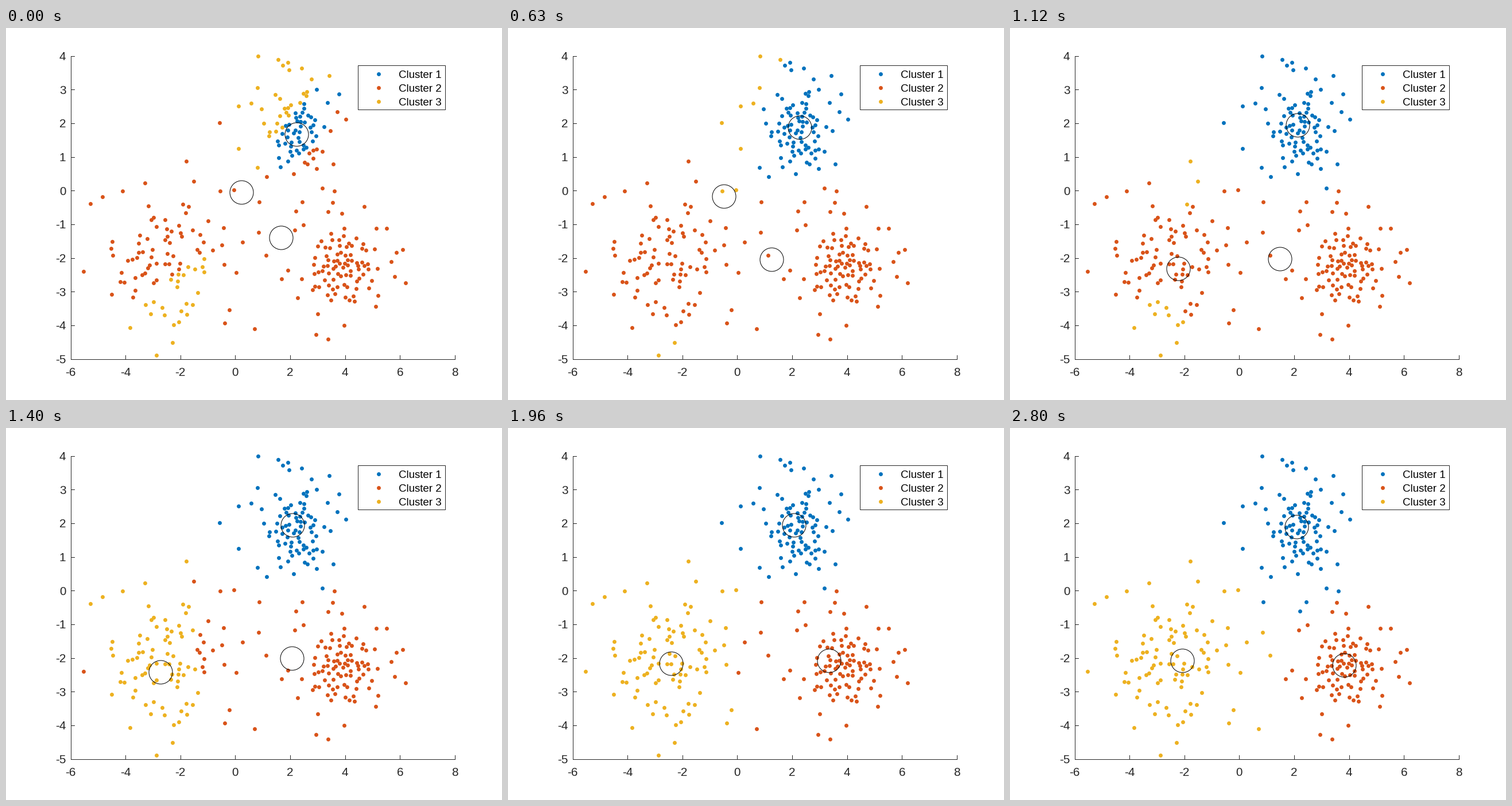
A matplotlib script for the animation above (3300 ms loop, 864 by 648 pixels).

```python
import numpy as np
import matplotlib.pyplot as plt
from matplotlib.animation import FuncAnimation
from matplotlib.patches import Rectangle

W, H = 864, 648
TICK_MS, STEP_MS, LOOP_MS, LAST_STEP = 10, 70, 3300, 40
LEFT, RIGHT, TOP, BOTTOM = 112.5, 782, 48.5, 576.5
INK = "#262626"
COLORS = ["#0072BD", "#D95319", "#EDB120"]


def to_px(x, y):
    return (LEFT + (x + 6) * (RIGHT - LEFT) / 14,
            BOTTOM - (y + 5) * (BOTTOM - TOP) / 9)


def to_data(px):
    return np.column_stack([(px[:, 0] - LEFT) * 14 / (RIGHT - LEFT) - 6,
                            (BOTTOM - px[:, 1]) * 9 / (BOTTOM - TOP) - 5])


# Outlying points of each group, in pixels; the dense cores are random.
TOP_RIM = [(439, 49), (474, 55), (491, 60), (515, 70), (482, 65), (493, 73),
           (563, 83), (532, 89), (580, 115), (541, 107), (560, 130),
           (577, 146), (592, 159), (565, 179), (551, 215), (570, 237),
           (541, 245), (572, 284), (551, 279), (516, 303), (454, 259),
           (438, 243), (405, 210), (405, 136), (372, 165), (427, 131),
           (438, 104)]
RIGHT_RIM = [(663, 349), (645, 349), (624, 311), (585, 323), (569, 304),
             (561, 320), (505, 319), (503, 352), (518, 343), (691, 386),
             (680, 391), (671, 407), (677, 433), (696, 444), (648, 466),
             (644, 485), (589, 518), (561, 542), (540, 534), (543, 498),
             (508, 470), (515, 437), (480, 437), (491, 422)]
LEFT_RIM = [(147, 306), (168, 294), (203, 284), (242, 270), (314, 232),
            (327, 267), (373, 284), (397, 282), (441, 303), (440, 356),
            (453, 396), (412, 373), (401, 426), (389, 491), (381, 514),
            (433, 524), (262, 570), (290, 548), (216, 522), (292, 517),
            (135, 424), (184, 464), (183, 384)]

rng = np.random.default_rng(12)


def add_core(rim, center, spread, count, gap=5.5):
    """Fill the inside of a rim with normally scattered points."""
    pts = [np.array(p, float) for p in rim]
    goal = len(pts) + count
    while len(pts) < goal:
        z = rng.normal(size=2)
        p = np.array(center) + z * spread
        if np.hypot(*z) < 1.85 and min(np.hypot(*(p - q)) for q in pts) > gap:
            pts.append(p)
    return np.array(pts)


points = np.vstack([
    add_core(TOP_RIM, (498, 178), (34, 42), 70),
    add_core(RIGHT_RIM, (582, 415), (36, 36), 78),
    add_core(LEFT_RIM, (285, 408), (62, 60), 79),
])
data = to_data(points)

# Mixture model over time: mean x, mean y, sd x, sd y, correlation, weight.
KEY_STEPS = [0, 9, 16, 20, 28, 32, 40]
MODELS = np.array([
    [(2.22, 1.68, .62, .62, .85, .10), (1.67, -1.40, 2.9, 1.85, -.35, .62),
     (.22, -.05, 1.7, 3.0, .82, .25)],
    [(2.28, 1.87, .75, 1.05, .3, .28), (1.24, -2.05, 2.9, 1.15, 0, .60),
     (-.48, -.17, 1.9, 3.2, .9, .10)],
    [(2.12, 1.95, .95, 1.05, 0, .32), (1.48, -2.03, 2.8, 1.2, 0, .55),
     (-2.22, -2.32, 1.0, 2.1, .6, .085)],
    [(2.09, 1.94, 1.0, 1.05, 0, .32), (2.06, -2.01, 2.6, 1.05, 0, .46),
     (-2.72, -2.42, .93, 1.25, -.1, .22)],
    [(2.07, 1.95, 1.0, 1.05, 0, .33), (3.34, -2.08, 1.7, .95, 0, .39),
     (-2.42, -2.16, 1.3, 1.3, 0, .28)],
    [(2.06, 1.93, .98, 1.08, 0, .33), (3.71, -2.15, 1.25, .93, 0, .34),
     (-2.16, -2.09, 1.45, 1.3, 0, .33)],
    [(2.09, 1.89, .97, 1.15, 0, .33), (3.81, -2.22, 1.05, .9, 0, .32),
     (-2.08, -2.07, 1.55, 1.3, 0, .35)],
])


def model_at(step):
    i = min(np.searchsorted(KEY_STEPS, step, side="right") - 1,
            len(KEY_STEPS) - 2)
    t = (step - KEY_STEPS[i]) / (KEY_STEPS[i + 1] - KEY_STEPS[i])
    return MODELS[i] * (1 - t) + MODELS[i + 1] * t


def score(g):
    """Log density of every point under one weighted Gaussian."""
    mx, my, sx, sy, rho, w = g
    zx, zy = (data[:, 0] - mx) / sx, (data[:, 1] - my) / sy
    free = 1 - rho ** 2
    dist = (zx ** 2 - 2 * rho * zx * zy + zy ** 2) / free
    return np.log(w / (sx * sy * np.sqrt(free))) - dist / 2


plt.rcParams["font.family"] = "Liberation Sans"
# At 72 dpi one point is one pixel.
fig = plt.figure(figsize=(W / 72, H / 72), dpi=72, facecolor="white")
ax = fig.add_axes([0, 0, 1, 1])
ax.set_xlim(0, W)
ax.set_ylim(H, 0)
ax.axis("off")


def rule(xs, ys):
    ax.plot(xs, ys, color=INK, lw=1, zorder=1)


rule([LEFT, RIGHT], [BOTTOM, BOTTOM])
rule([LEFT, LEFT], [BOTTOM, TOP])
for v in range(-6, 9, 2):
    x, _ = to_px(v, 0)
    rule([x, x], [BOTTOM, BOTTOM - 6.7])
    ax.text(x, 606, str(v), size=20.8, color=INK, ha="center", va="baseline")
for v in range(-5, 5):
    _, y = to_px(0, v)
    rule([LEFT, LEFT + 6.7], [y, y])
    ax.text(104.5, y + 7.5, str(v), size=20.8, color=INK, ha="right",
            va="baseline")


def dots(color, xs=(), ys=()):
    return ax.plot(xs, ys, "o", color=color, ms=6.9, mew=0, zorder=4)[0]


ax.add_patch(Rectangle((612.5, 64.5), 152, 77, fc="white", ec=INK, lw=1,
                       zorder=3))
for i, color in enumerate(COLORS):
    y = 80 + 24 * i
    dots(color, [649], [y])
    ax.text(684, y + 7, f"Cluster {i + 1}", size=18.75, color="black",
            va="baseline", zorder=4)

groups = [dots(c) for c in COLORS]
rings = ax.plot([], [], "o", ms=41, mfc="none", mec="black", mew=1,
                zorder=5)[0]


def draw(tick):
    step = min(tick * TICK_MS // STEP_MS, LAST_STEP)
    model = model_at(step)
    labels = np.argmax([score(g) for g in model], axis=0)
    for k, line in enumerate(groups):
        line.set_data(*points[labels == k].T)
    rings.set_data(*to_px(model[:, 0], model[:, 1]))
    return [*groups, rings]


anim = FuncAnimation(fig, draw, frames=LOOP_MS // TICK_MS, interval=TICK_MS,
                     init_func=lambda: draw(0), repeat=True, repeat_delay=0,
                     blit=False)
plt.show()
```
